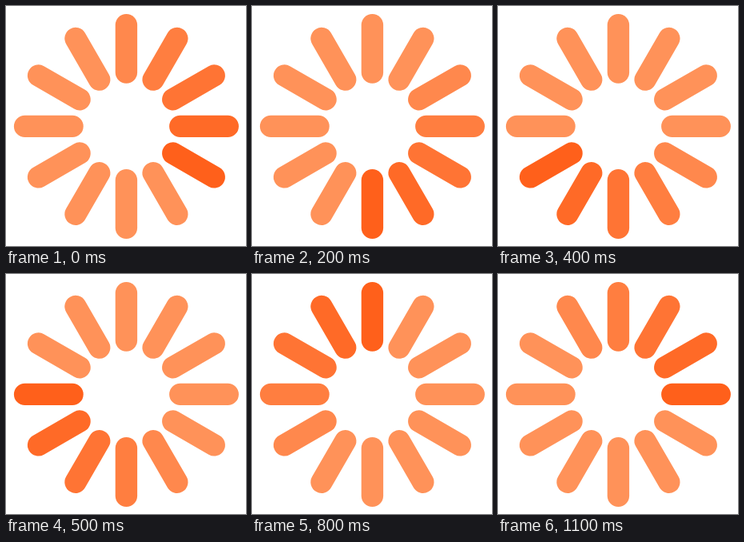
These frames come from a looping animation (300 by 300 pixels, 1200 ms). An HTML page with a canvas:

```html
<!DOCTYPE html>
<html lang="en">
<head>
<meta charset="utf-8">
<title>Spinner</title>
<style>
  html, body { margin: 0; width: 100%; height: 100%; overflow: hidden; background: #fff; }
  canvas { display: block; }
</style>
</head>
<body>
<canvas id="stage" width="300" height="300"></canvas>
<script>
  const ctx = document.getElementById('stage').getContext('2d');
  const BARS = 12, STEP_MS = 100, TRAIL = 5;
  const CENTER = 150.4, INNER = 67.4, OUTER = 126.8;
  const DARK = [255, 96, 27], LIGHT = [255, 146, 89];

  // Colour fades from the head to the resting tone over TRAIL bars.
  function shade(age) {
    const t = Math.min(age / TRAIL, 1);
    return `rgb(${DARK.map((c, i) => Math.round(c + (LIGHT[i] - c) * t))})`;
  }

  function draw(step) {
    const head = step + 1;
    ctx.clearRect(0, 0, 300, 300);
    ctx.lineWidth = 27.4;
    ctx.lineCap = 'round';
    for (let i = 0; i < BARS; i++) {
      const angle = i * 2 * Math.PI / BARS;
      const cos = Math.cos(angle), sin = Math.sin(angle);
      ctx.strokeStyle = shade((head - i + BARS) % BARS);
      ctx.beginPath();
      ctx.moveTo(CENTER + INNER * cos, CENTER + INNER * sin);
      ctx.lineTo(CENTER + OUTER * cos, CENTER + OUTER * sin);
      ctx.stroke();
    }
  }

  function frame() {
    draw(Math.floor(performance.now() / STEP_MS) % BARS);
    requestAnimationFrame(frame);
  }
  frame();
</script>
</body>
</html>
```
